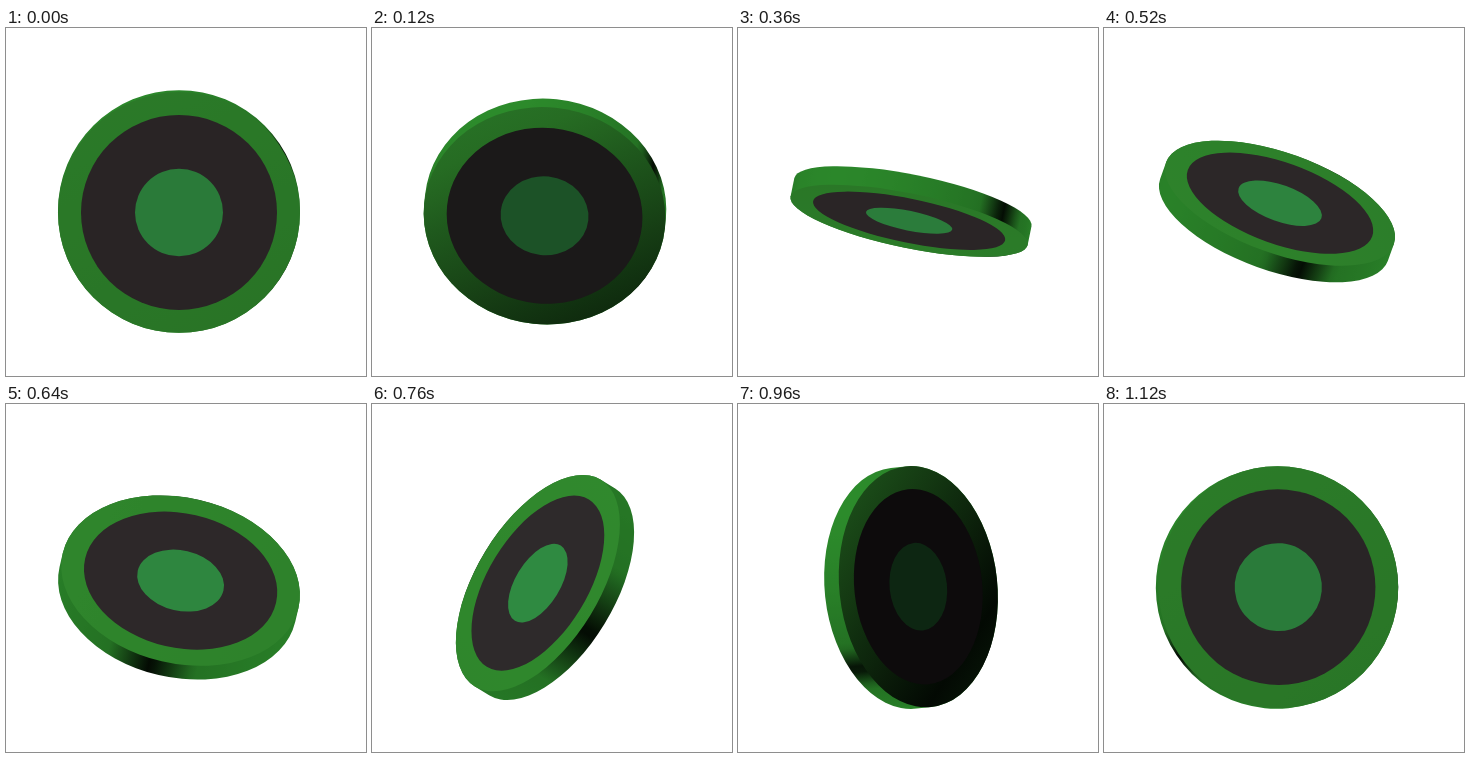
An HTML page that plays this animation: 360x348 px, repeating every 1.16 s.

```html
<!DOCTYPE html>
<html lang="en">
<head>
<meta charset="utf-8">
<title>Spinning chip</title>
<style>
  html, body { margin: 0; width: 100%; height: 100%; overflow: hidden; background: #fff; }
  svg { display: block; width: 360px; height: 348px; }
</style>
</head>
<body>
<svg viewBox="0 0 360 348">
  <defs>
    <linearGradient id="sideFill" gradientUnits="userSpaceOnUse" x1="-121" x2="121" y1="0" y2="0"></linearGradient>
    <linearGradient id="rimFill"></linearGradient>
  </defs>
  <g id="chip">
    <path id="side" fill="url(#sideFill)"/>
    <ellipse id="rim" fill="url(#rimFill)"/>
    <ellipse id="disc"/>
    <ellipse id="emblem"/>
  </g>
</svg>
<script>
const STEP = 40, STEPS = 29;
const CENTER = [173, 183.5], RADIUS = 121, HALF_THICKNESS = 9.7;
const LIGHT = [0.44, 0.74, -0.51];
const COLORS = {
  side: [44, 138, 43],
  rim: [48, 137, 45],
  disc: [47, 42, 43],
  emblem: [48, 140, 66]
};

// Step and facing direction (x right, y down, z toward the viewer).
const KEYS = [
  [0, [0, 0.1, 0.995]],
  [5, [-0.02, 0.64, 0.77]],
  [9, [-0.195, 0.955, 0.225]],
  [16, [-0.165, 0.71, -0.685]],
  [21, [0.985, 0.155, -0.08]],
  [24, [0.75, -0.08, 0.65]],
  [28, [0.13, -0.04, 0.99]]
];

const byId = id => document.getElementById(id);
const dot = (a, b) => a.reduce((sum, v, i) => sum + v * b[i], 0);
const setAttrs = (el, attrs) => {
  for (const name in attrs) el.setAttribute(name, attrs[name]);
};

function addStops(gradient, count) {
  return Array.from({ length: count + 1 }, (_, i) => {
    const stop = document.createElementNS("http://www.w3.org/2000/svg", "stop");
    stop.setAttribute("offset", i / count);
    gradient.append(stop);
    return stop;
  });
}

const sideStops = addStops(byId("sideFill"), 40);
const rimStops = addStops(byId("rimFill"), 8);

// Two opposed lights: a surface is dark only where it is edge-on to both.
function shade(color, lit) {
  const d = Math.abs(lit);
  const k = 0.06 + 0.7 * Math.min(1, d / 0.22) + 0.25 * d;
  return `rgb(${color.map(c => Math.round(c * k)).join()})`;
}

function keyAt(i) {
  const n = KEYS.length, lap = Math.floor(i / n);
  const [step, dir] = KEYS[i - lap * n];
  return [step + lap * STEPS, dir];
}

function tangent(i, axis) {
  const [[s0, a], [s1, b], [s2, c]] = [keyAt(i - 1), keyAt(i), keyAt(i + 1)];
  const before = s1 - s0, after = s2 - s1;
  return ((b[axis] - a[axis]) / before * after +
          (c[axis] - b[axis]) / after * before) / (before + after);
}

// Smooth path through the keys; both faces look alike, so return the visible one.
function visibleNormal(step) {
  let i = KEYS.length - 1;
  while (KEYS[i][0] > step) i--;
  const [s0, p] = keyAt(i), [s1, q] = keyAt(i + 1);
  const span = s1 - s0, t = (step - s0) / span, u = 1 - t;
  const v = [0, 1, 2].map(k =>
    u * u * (1 + 2 * t) * p[k] + t * t * (3 - 2 * t) * q[k] +
    span * t * u * (u * tangent(i, k) - t * tangent(i + 1, k)));
  const length = Math.hypot(...v) * (v[2] < 0 ? -1 : 1);
  return v.map(c => c / length);
}

function draw(time) {
  const n = visibleNormal(Math.floor(time / STEP) % STEPS);
  const tilt = Math.hypot(n[0], n[1]);
  const ux = n[0] / tilt, uy = n[1] / tilt;
  const across = [uy, -ux, 0];
  const along = [ux * n[2], uy * n[2], -tilt];
  const lit = dot(n, LIGHT), litX = dot(across, LIGHT), litY = dot(along, LIGHT);
  const offset = HALF_THICKNESS * tilt;
  const ry = RADIUS * n[2];

  const angle = Math.atan2(-ux, uy) * 180 / Math.PI;
  byId("chip").setAttribute("transform", `translate(${CENTER}) rotate(${angle})`);

  byId("side").setAttribute("d",
    `M${-RADIUS} ${offset}V${-offset}A${RADIUS} ${ry} 0 0 1 ${RADIUS} ${-offset}` +
    `V${offset}A${RADIUS} ${ry} 0 0 1 ${-RADIUS} ${offset}Z`);
  sideStops.forEach((stop, i) => {
    const x = i / (sideStops.length - 1) * 2 - 1;
    stop.setAttribute("stop-color", shade(COLORS.side, x * litX - Math.sqrt(1 - x * x) * litY));
  });

  const slope = Math.hypot(litX, litY) || 1;
  const gx = litX / slope / 2, gy = litY / slope / 2;
  setAttrs(byId("rimFill"), { x1: 0.5 - gx, y1: 0.5 - gy, x2: 0.5 + gx, y2: 0.5 + gy });
  rimStops.forEach((stop, i) => {
    const x = i / (rimStops.length - 1) * 2 - 1;
    stop.setAttribute("stop-color", shade(COLORS.rim, lit + 0.08 * x * slope));
  });

  const face = (id, r) => setAttrs(byId(id), { cy: offset, rx: r, ry: r * n[2] });
  face("rim", RADIUS);
  face("disc", 98);
  face("emblem", 44);
  byId("disc").setAttribute("fill", shade(COLORS.disc, lit));
  byId("emblem").setAttribute("fill", shade(COLORS.emblem, lit));
}

const start = performance.now();
function tick() {
  draw(performance.now() - start);
  requestAnimationFrame(tick);
}
tick();
</script>
</body>
</html>
```
